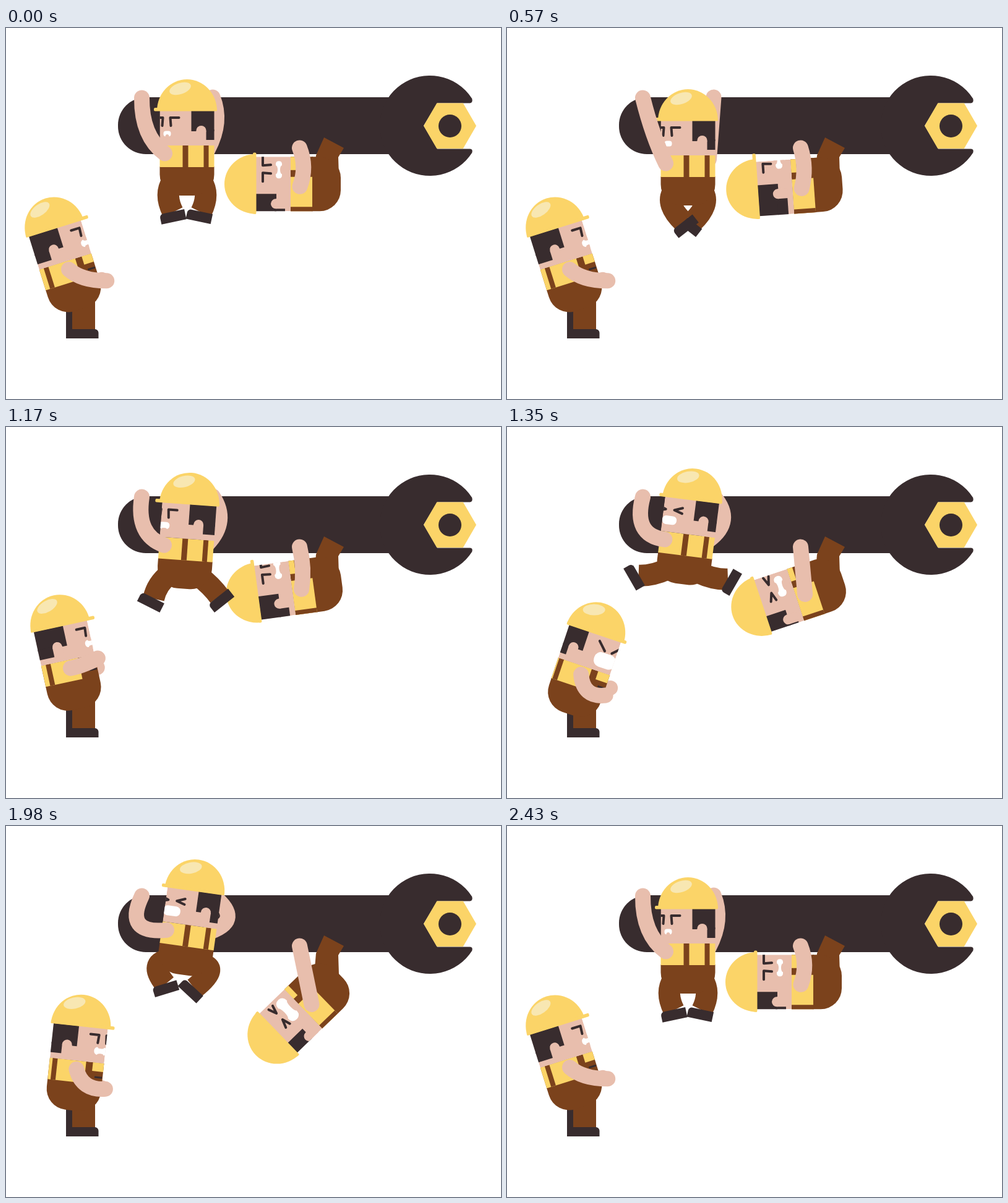
An HTML page with a canvas for the animation above (2.7 s loop, 800 px wide and 600 px high).

```html
<!DOCTYPE html>
<html lang="en">
<head>
<meta charset="utf-8">
<title>Workers and wrench</title>
<style>
html, body { margin: 0; width: 100%; height: 100%; overflow: hidden; background: #fff; }
canvas { display: block; width: 800px; height: 600px; }
</style>
</head>
<body>
<canvas id="stage" width="800" height="600"></canvas>
<script>
const ctx = document.getElementById('stage').getContext('2d');
const DARK = '#382c2e', YELLOW = '#fbd468', SKIN = '#e8bead', BROWN = '#7b421c', SHINE = '#f8e7b2';
const LOOP = 2700, REST = 2430, STEP = 30, RAD = Math.PI / 180;
const HIP = 91; // distance from helmet edge to waist

const clamp = (v, lo = 0, hi = 1) => Math.max(lo, Math.min(hi, v));
const ramp = (v, from, to) => {
  const u = clamp((v - from) / (to - from));
  return u * u * (3 - 2 * u);
};
const mix = (a, b, u) => a + (b - a) * u;

// Smooth motion through [time, value] keys without overshoot.
function path(...keys) {
  const slope = i => (keys[i + 1][1] - keys[i][1]) / (keys[i + 1][0] - keys[i][0]);
  const tangent = i => {
    if (i === 0 || i === keys.length - 1) return 0;
    const a = slope(i - 1), b = slope(i);
    return a * b > 0 ? 2 * a * b / (a + b) : 0;
  };
  return t => {
    let i = 0;
    while (i < keys.length - 2 && t >= keys[i + 1][0]) i++;
    const span = keys[i + 1][0] - keys[i][0];
    const u = clamp((t - keys[i][0]) / span), w = 1 - u;
    return mix(keys[i][1], keys[i + 1][1], u * u * (3 - 2 * u))
      + span * u * w * (w * tangent(i) - u * tangent(i + 1));
  };
}

// Each worker is driven by one main motion; the rest of the pose follows from it.
const hangerLift = path([0, 0], [300, 25], [570, -16], [960, 0], [1350, 16], [1620, 23], [1980, 29], [2160, 7], [2430, 0]);
const hangerKick = path([0, -12], [150, 55], [570, -38], [960, -12], [1350, 60], [1620, 3], [1980, -30], [2160, 50], [2430, -12]);
const hangerStagger = path([570, 0], [960, 13], [1350, 0], [1620, 0], [1980, -13], [2160, 0]);
const hangerTurn = path([570, 0], [960, 11], [1400, 0]);
const clingerSwing = path([0, 0], [280, -9], [570, -4], [960, 0], [1350, -18.4], [1620, -32], [1980, -44], [2430, 0]);
const clingerTurn = path([0, -9], [570, 13], [960, 14], [1350, -11], [1980, -15], [2430, -9]);
const pusherTilt = path([570, -17.4], [800, -26], [960, -22.8], [1080, -22], [1350, 18.6], [1620, 30], [1980, 6.2], [2160, -17.4]);

const EYES = {
  calm: [[13, 11], [27, 11], [26, 24]],
  squeezed: [[13, 15], [26, 20], [13, 24]],
  angry: [[14, 9], [20, 15], [27, 22]]
};

function poly(points, color) {
  ctx.fillStyle = color;
  ctx.beginPath();
  points.forEach(p => ctx.lineTo(...p));
  ctx.closePath();
  ctx.fill();
}
function rect(x, y, w, h, color, radii = 0) {
  ctx.fillStyle = color;
  ctx.beginPath();
  ctx.roundRect(x, y, w, h, radii);
  ctx.fill();
}
function oval(x, y, rx, ry, color, turn = 0) {
  ctx.fillStyle = color;
  ctx.beginPath();
  ctx.ellipse(x, y, rx, ry, turn, 0, 2 * Math.PI);
  ctx.fill();
}
function limb(from, mid, to, color, width, cap) {
  ctx.strokeStyle = color;
  ctx.lineWidth = width;
  ctx.lineCap = cap;
  ctx.beginPath();
  ctx.moveTo(...from);
  ctx.quadraticCurveTo(...mid, ...to);
  ctx.stroke();
}
const arm = (from, mid, to) => limb(from, mid, to, SKIN, 25, 'round');

// Turns a point of a body at [x, y, angle] into a stage point.
function place([cx, cy, angle], x, y) {
  const c = Math.cos(angle * RAD), s = Math.sin(angle * RAD);
  return [cx + x * c - y * s, cy + x * s + y * c];
}
function within([x, y, angle], draw) {
  ctx.save();
  ctx.translate(x, y);
  ctx.rotate(angle * RAD);
  draw();
  ctx.restore();
}
const bodyOnHip = (x, y, angle) => [...place([x, y, angle], 0, -HIP), angle];

function drawWrench() {
  rect(181, 112, 460, 92, DARK, [45, 0, 0, 45]);
  ctx.beginPath();
  ctx.arc(685, 158, 81, .57, -.57);
  ctx.quadraticCurveTo(755, 121, 750, 121.5);
  ctx.lineTo(697, 121.5);
  ctx.lineTo(675, 158);
  ctx.lineTo(697, 195.5);
  ctx.lineTo(750, 195.5);
  ctx.quadraticCurveTo(755, 196, 753.2, 201.7);
  ctx.fill();
  const corner = i => [717.5 + 42.5 * Math.cos(i * 60 * RAD), 158.3 + 42.5 * Math.sin(i * 60 * RAD)];
  poly([0, 1, 2, 3, 4, 5].map(corner), YELLOW);
  oval(717.5, 158.5, 18.5, 18.5, DARK);
}

function drawMouth(x, { w, h, top, bottom }) {
  const y = 37;
  rect(x - w, y - h, 2 * w, 2 * h, '#fff', Math.min(w, h) * .9);
  if (top > .02) oval(x, y - h, w * .5, h * top, SKIN);
  if (bottom > .02) oval(x, y + h, w * .5, h * bottom, SKIN);
}

// Head looking to the right; the helmet's lower edge lies on y = 0.
function drawHead({ turn, mood, mouth, shineX }) {
  ctx.save();
  ctx.beginPath();
  ctx.rect(-44, -1, 88, 57);
  ctx.clip();
  rect(-44, -1, 88, 58, SKIN);
  rect(-60, -1, 53 + turn, 34, DARK);
  rect(-60, 30, 30 + turn, 17, DARK);
  oval(turn - 23, 32, 8, 8, SKIN);
  rect(turn - 31, 32, 16, 16, SKIN);

  ctx.strokeStyle = DARK;
  ctx.lineWidth = 4;
  ctx.lineCap = ctx.lineJoin = 'round';
  for (const mirror of [false, true]) {
    ctx.beginPath();
    EYES[mood].forEach(([x, y]) => ctx.lineTo(turn + (mirror ? 66 - x : x), y));
    ctx.stroke();
  }
  drawMouth(32 + turn, mouth);
  ctx.restore();

  ctx.fillStyle = YELLOW;
  ctx.beginPath();
  ctx.ellipse(0, 0, 48.5, 51, 0, Math.PI, 0);
  ctx.fill();
  rect(-48.5, -5, 102 + .3 * turn, 5.5, YELLOW, 2);
  if (shineX) oval(shineX, -36, 18, 9, SHINE, shineX > 0 ? .32 : -.32);
}

const drawPants = () => rect(-44, HIP - 1, 88, 47, BROWN, [0, 0, 34, 34]);

// Overalls seen from the side, with a short yellow patch above the bib.
function drawSideTorso(turn, patch) {
  const back = -41 + .4 * turn, front = 14 + .25 * turn;
  const left = Math.max(-44, back);
  rect(-44, 56, 88, 36, BROWN);
  rect(-44, 56, 44 + front, 35, YELLOW);
  rect(left, 56, back + 8 - left, 35, BROWN);
  rect(front + 11, 56, 33 - front, patch, YELLOW);
}

// side is -1 for the left leg and 1 for the right; kick turns the foot outwards.
function drawLeg(body, side, kick, lift) {
  const [x, y] = place(body, side * 24, 115);
  const up = Math.max(0, lift);
  const knee = [x + side * (13 + .8 * up), y + 20 - .5 * up];
  const ankle = [
    x + side * (6 + .6 * kick + .4 * up),
    y + 49 - .3 * up - 33 * (Math.max(0, kick) / 60) ** 2
  ];
  limb([x, y], knee, ankle, BROWN, 35, 'butt');
  within([...ankle, -side * kick], () => rect(-22, -1, 41, 16.5, DARK, [6, 0, 0, 0]));
}

function drawHanger(t) {
  const lift = hangerLift(t), up = Math.max(0, lift);
  const kick = hangerKick(t), stagger = hangerStagger(t);
  const strain = ramp(lift, 0, 25);
  const body = [292.5 + .42 * up, 134 - lift, Math.min(8, .45 * up)];

  arm([334, 112], [350 + 1.2 * lift, 152], place(body, 34, 62));
  drawLeg(body, 1, kick + stagger, lift);
  drawLeg(body, -1, kick - stagger, lift);
  within(body, () => {
    drawPants();
    ctx.scale(-1, 1);
    rect(-44, 56, 88, 35, YELLOW);
    rect(-35, 56, 8, 35, BROWN);
    rect(-2, 56, 9, 35, BROWN);
    drawHead({
      turn: hangerTurn(t),
      mood: lift > 10 ? 'squeezed' : 'calm',
      mouth: { w: 6 + 8 * strain, h: 4.5 + 3.5 * strain, top: 0, bottom: .8 * clamp(1 - Math.abs(lift) / 14) },
      shineX: 11
    });
  });
  arm([219.5, 113], [219 - lift, 175], place(body, -36, 69));
}

function drawClinger(t) {
  const swing = clingerSwing(t), drop = -swing;
  const body = bodyOnHip(495 + .24 * drop, 252.3 + .44 * drop, swing - 90);
  const hip = place(body, 0, HIP);
  const shoulder = place(body, -4, 71), hand = [474.5, 194];
  const bend = 12 * clamp(1 - drop / 18);
  const notch = .6 - .007 * drop;

  poly([[514, 177], [546, 194], [537, 209], [538, 240], hip, [499, 230], [501, 206]], BROWN);
  within(body, () => {
    drawPants();
    drawSideTorso(-10, 9);
    drawHead({
      turn: clingerTurn(t),
      mood: drop > 10 ? 'squeezed' : 'calm',
      mouth: { w: 14 + .17 * drop, h: 5 + .1 * drop, top: notch, bottom: notch }
    });
  });
  arm(hand, [mix(hand[0], shoulder[0], .5) + bend, mix(hand[1], shoulder[1], .5)], shoulder);
}

function drawPusher(t) {
  const tilt = pusherTilt(t);
  const body = bodyOnHip(109.7 + .2 * tilt, 411 + .5 * Math.max(0, tilt), tilt);
  const hipY = place(body, 0, HIP)[1];
  const turn = Math.min(11, 8 - .6 * tilt);
  const effort = ramp(tilt, 4, 18);
  const raised = ramp(t, 570, 900) * (1 - ramp(t, 1050, 1300));
  const hand = [mix(161 - .1 * tilt, 136, raised), mix(421 + .7 * tilt, 340, raised)];
  const elbow = [mix(123, 118, raised), mix(423 + .8 * tilt, 365, raised)];

  oval(hand[0] - 8 + 16 * effort + 14 * raised, hand[1] - 2 - 10 * effort + 32 * raised, 12, 12, SKIN);
  rect(97, 440, 11, 62, DARK);
  rect(107, hipY, 37, 490 - hipY, BROWN);
  rect(97, 487, 52.5, 15, DARK, [0, 6, 0, 0]);
  within(body, () => {
    drawPants();
    drawSideTorso(turn, 14);
    rect(31, 78, 12, 3, DARK);
    drawHead({
      turn,
      mood: tilt > 8 ? 'angry' : 'calm',
      mouth: { w: 10 + 8 * effort, h: 6 + 6 * effort, top: .4 * (1 - effort), bottom: .4 * (1 - effort) },
      shineX: -14
    });
  });
  arm(place(body, .15 * turn, 70), elbow, hand);
}

const start = performance.now();
function frame() {
  const elapsed = (performance.now() - start) % LOOP;
  const t = Math.min(REST, Math.floor(elapsed / STEP) * STEP);
  rect(0, 0, 800, 600, '#fff');
  drawWrench();
  drawClinger(t);
  drawHanger(t);
  drawPusher(t);
  requestAnimationFrame(frame);
}
frame();
</script>
</body>
</html>
```
